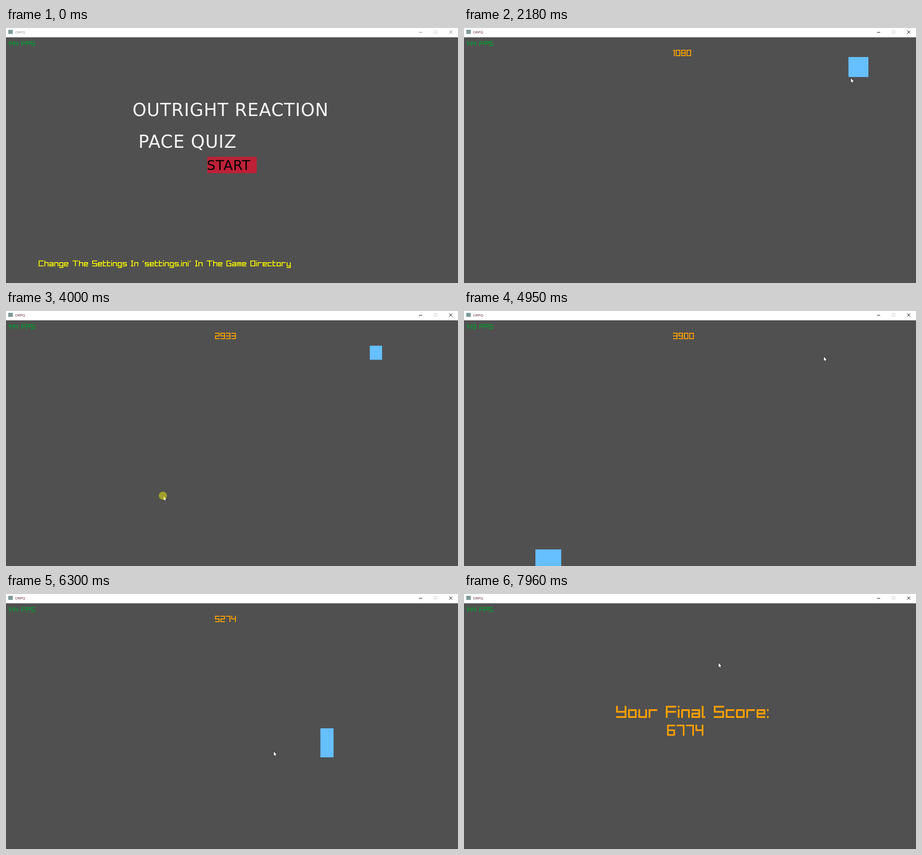
An HTML page with a canvas for the animation above (8 s loop, 997 by 562 pixels).

```html
<!DOCTYPE html>
<html lang="en">
<head>
<meta charset="utf-8">
<title>ORPQ</title>
<style>
  html, body { margin: 0; width: 100%; height: 100%; overflow: hidden; background: #505050; }
  canvas { display: block; }
</style>
</head>
<body>
<canvas id="stage" width="997" height="562"></canvas>
<script>
const ctx = document.getElementById('stage').getContext('2d');
const LOOP = 8000, GAME_START = 1120, GAME_END = 7774, FINAL_SCORE = 6774;
const REACTION = 180, MOVE_TIME = 420, CLICK_GLOW = 130, ARC = 0.14;
const ORANGE = '#ffa100', LIME = '#009e2f';

// Blocky font: width in cells, then segments (a-g as on a seven-segment display, the rest below).
const GLYPHS = {
  0: '5abcdef', 1: '2kbc', 2: '5abged', 3: '5abgcd', 4: '5fgbc', 5: '5afgcd', 6: '5afgecd',
  7: '5abc', 8: '5abcdefg', 9: '5abcdfg', ' ': '3', '.': '1p', ':': '1qp', "'": '2xz',
  C: '6adef', D: '6abcdef', F: '6aefg', G: '6acdefv', I: '3ajd', P: '6abefg', S: '6afgcd', T: '7aj', Y: '6fgbcd',
  a: '5abcdeg', c: '5adef', e: '5abdefg', g: '5abcdefy', h: '5abcefi', i: '1efk', l: '2iefd', m: '5abcefj',
  n: '5abcef', o: '5abcdef', r: '5aef', s: '5afgcd', t: '4iaefd', u: '5bcdef', y: '5bcdefy'
};

function addSegment(seg, w, top, mid, cell) {
  const right = w - 1;
  const dot = (x, y) => cell(x, y, 1, 1);
  const bar = (y, x = 0) => cell(x, y, w - x, 1);
  const post = (x, from, to) => cell(x, from, 1, to - from + 1);
  switch (seg) {
    case 'a': return bar(top);
    case 'b': return post(right, top, mid);
    case 'c': return post(right, mid, 6);
    case 'd': return bar(6);
    case 'e': return post(0, mid, 6);
    case 'f': return post(0, top, mid);
    case 'g': return bar(mid);
    case 'i': return post(0, 0, top);
    case 'j': return post(right / 2, top, 6);
    case 'k': return dot(0, 0);
    case 'p': return dot(0, 6);
    case 'q': return dot(0, 2);
    case 'v': return bar(mid, w / 2);
    case 'x': return dot(1, 0);
    case 'y': post(right, 6, 8); return bar(8);
    case 'z': return dot(0, 1);
  }
}

function pixelText(text, x, y, unit, color) {
  const cell = (cx, cy, w, h) => ctx.rect(x + cx * unit, y + cy * unit, w * unit, h * unit);
  ctx.fillStyle = color;
  ctx.beginPath();
  for (const char of String(text)) {
    const [width, ...segments] = GLYPHS[char];
    const lower = /[a-z]/.test(char);
    for (const seg of segments) addSegment(seg, +width, lower ? 2 : 0, lower ? 4 : 3, cell);
    x += (+width + 1) * unit;
  }
  ctx.fill();
}

function label(text, x, y, font, color, spacing = 0) {
  ctx.font = font;
  ctx.letterSpacing = spacing + 'px';
  ctx.fillStyle = color;
  ctx.fillText(text, x, y);
}

function box(color, x, y, w, h) {
  ctx.fillStyle = color;
  ctx.fillRect(x, y, w, h);
}

const stop = (time, x, y, w = 44, h = 44) => ({ time, x, y, w, h });

// A target is shown until it is clicked at its time; x and y are its centre.
const targets = [
  stop(1750, 822, 190, 66, 70),
  stop(2659, 870, 86),
  stop(3310, 302, 525.5, 38, 59),
  stop(3960, 347, 407),
  stop(4723, 816, 92, 27, 31),
  stop(5330, 186, 544, 57, 37),
  stop(5813, 36, 520),
  stop(6450, 708, 328, 29, 64),
  stop(7240, 642, 464),
  stop(GAME_END, 561, 151)
];
const clicks = [stop(GAME_START, 521, 290), ...targets];
const pointerStops = [stop(-150, 862, 562), stop(450, 510, 353), ...clicks];

// The pointer waits for the reaction time, then eases to the next stop in a shallow upward arc.
function pointerAt(t) {
  const next = pointerStops.findIndex(({ time }) => t < time);
  if (next < 0) return pointerStops.at(-1);
  const from = pointerStops[next - 1], to = pointerStops[next];
  const start = from.time + REACTION;
  const u = (t - start) / Math.min(MOVE_TIME, to.time - start);
  const p = Math.min(1, Math.max(0, u));
  const s = p * p * (3 - 2 * p);
  const dy = to.y - from.y;
  return {
    x: from.x + (to.x - from.x) * s,
    y: from.y + dy * s - ARC * Math.abs(dy) * 4 * s * (1 - s)
  };
}

function fpsAt(t) {
  if (t > 2500 && t < 3300) return 116;
  if (t > 4850 && t < 5300) return 143;
  return 144;
}

function drawTitleBar(active) {
  const ink = active ? '#000' : '#777';
  box('#fff', 0, 0, 997, 20.5);
  box('#7c9b98', 5, 4, 10, 9);
  label('ORPQ', 20, 12, '8px "Open Sans", sans-serif', active ? '#5c1020' : '#9a8c8c');
  box(ink, 911, 9, 7, 1);
  ctx.lineWidth = 1;
  ctx.strokeStyle = '#d0d0d0';
  ctx.strokeRect(944.5, 5.5, 6, 6);
  ctx.strokeStyle = ink;
  ctx.stroke(new Path2D('M977.5 5.5l7 7m0 -7l-7 7'));
}

function drawMenu() {
  const big = '39px "DejaVu Sans", sans-serif';
  label('OUTRIGHT REACTION', 279, 193.5, big, '#f5f5f5', 0.9);
  label('PACE QUIZ', 292, 264, big, '#f5f5f5', 0.9);
  box('#be2137', 444, 284, 109, 36);
  label('START', 443, 313, '30px "DejaVu Sans", sans-serif', '#000', 0.8);
  pixelText("Change The Settings In 'settings.ini' In The Game Directory", 72, 512.5, 1.817, '#ff0');
}

function drawGame(t) {
  const score = FINAL_SCORE * (t - GAME_START) / (GAME_END - GAME_START);
  pixelText(Math.round(score), 461, 48, 2, ORANGE);
  const { x, y, w, h } = targets.find(({ time }) => t < time);
  box('#66bfff', x - w / 2, y - h / 2, w, h);
}

function drawScore() {
  pixelText('Your Final Score:', 335.5, 246.5, 3.78, ORANGE);
  pixelText(FINAL_SCORE, 448, 288, 3.48, ORANGE);
}

const ARROW = new Path2D('M0 0V11.5L2.6 9.2L4.4 13.4L6.2 12.6L4.5 8.6H8Z');

function drawPointer(t) {
  const { x, y } = pointerAt(t);
  ctx.save();
  ctx.translate(x, y);
  ctx.fillStyle = '#fff';
  ctx.strokeStyle = '#000';
  ctx.lineWidth = 0.8;
  ctx.fill(ARROW);
  ctx.stroke(ARROW);
  if (clicks.some(({ time }) => t >= time && t < time + CLICK_GLOW)) {
    ctx.fillStyle = 'rgba(255, 248, 0, 0.47)';
    ctx.beginPath();
    ctx.arc(-1, 0, 9, 0, 2 * Math.PI);
    ctx.fill();
  }
  ctx.restore();
}

function draw(t) {
  box('#505050', 0, 0, 997, 562);
  drawTitleBar(t >= GAME_START);
  pixelText(fpsAt(t) + ' FPS', 5.5, 29.3, 1.49, LIME);
  if (t < GAME_START) drawMenu();
  else if (t < GAME_END) drawGame(t);
  else drawScore();
  if (t >= 80) drawPointer(t);
}

const begin = performance.now();
function tick() {
  draw((performance.now() - begin) % LOOP);
  requestAnimationFrame(tick);
}
tick();
</script>
</body>
</html>
```
